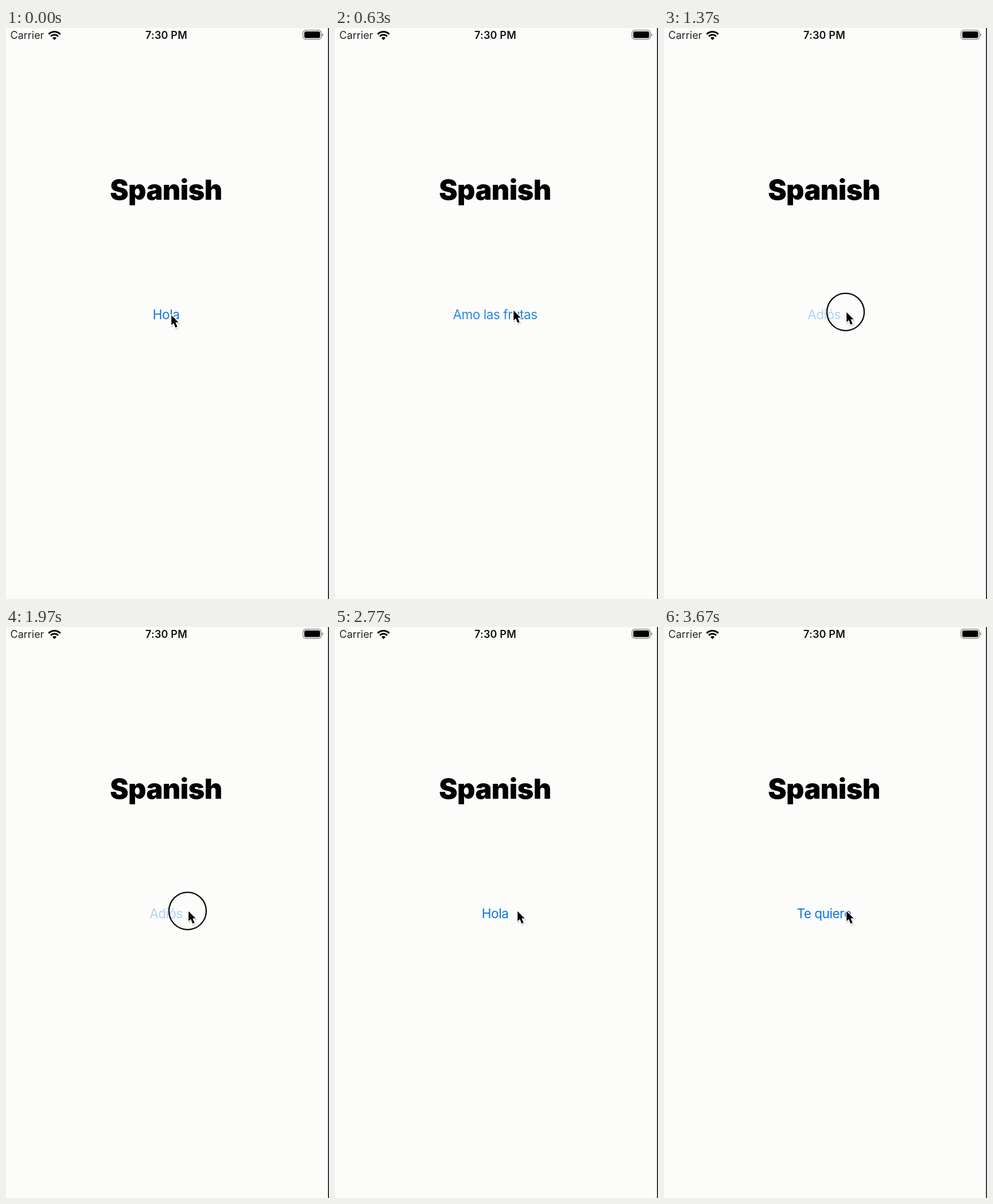
These frames come from a looping animation (563x994 px, 3710 ms). An HTML page:

```html
<!DOCTYPE html>
<html lang="en">
<head>
<meta charset="utf-8">
<title>Spanish phrases</title>
<style>
  html, body { margin: 0; width: 100%; height: 100%; overflow: hidden; background: #fcfcfa; }
  svg { display: block; width: 563px; height: 994px; }
  text { font-family: Inter, Roboto, sans-serif; }
  .status { font-size: 18px; }
  .clock { font-weight: 600; letter-spacing: .2px; text-anchor: middle; }
  .title { font-size: 48.5px; font-weight: 900; letter-spacing: -.5px; text-anchor: middle; }
  .word { font-size: 22.5px; letter-spacing: -.45px; text-anchor: middle; fill: #0b75e5; }
</style>
</head>
<body>
<svg viewBox="0 0 563 994">
  <rect width="563" height="994" fill="#fcfcfa"/>
  <rect x="561.3" width="1.7" height="994" fill="#1c1c2b"/>

  <text class="status" x="7.5" y="19" fill="#222">Carrier</text>
  <clipPath id="fan"><path d="M84.5 21L66.5 3V0H102.5V3Z"/></clipPath>
  <g clip-path="url(#fan)" fill="none" stroke="#050505" stroke-width="3">
    <circle cx="84.5" cy="20.5" r="14"/>
    <circle cx="84.5" cy="20.5" r="8.8"/>
    <circle cx="84.5" cy="20.5" r="4.7" fill="#050505" stroke="none"/>
  </g>
  <text class="status clock" x="279.5" y="19" fill="#111">7:30 PM</text>
  <rect x="517.7" y="3.7" width="32" height="16" rx="5" fill="none" stroke="#8f8f8f" stroke-width="1.5"/>
  <rect x="520" y="6" width="27.5" height="11.5" rx="2.8"/>
  <path d="M551.2 9.2Q553.2 10 553.2 12T551.2 14.8Z" fill="#8f8f8f"/>

  <text class="title" x="279" y="299">Spanish</text>
  <text class="word" id="word" x="279.1" y="506.7"></text>

  <circle id="ring" fill="none" r="32.5" stroke="#0a0a0a" stroke-width="2.3"/>
  <g id="cursor" stroke-linejoin="round">
    <path d="M0 0V17.2L4 13.6L7 21.5L10.4 20.1L7.2 12.5H12.3Z" transform="translate(.8 1.8)"
      fill="#000" stroke="#000" stroke-width="3.6" opacity=".13"/>
    <path d="M0 0V17.2L4 13.6L7 21.5L10.4 20.1L7.2 12.5H12.3Z"
      fill="#000" stroke="#fff" stroke-width="2.8" paint-order="stroke"/>
  </g>
</svg>
<script>
  const LOOP = 3710, FADE = 250, DIM = 0.3;
  const [word, ring, cursor] = ['word', 'ring', 'cursor'].map(id => document.getElementById(id));

  // A tap dims the button while held; releasing it shows the next phrase.
  const taps = [
    { down: 350, up: 450, text: 'Amo las frutas' },
    { down: 900, up: 1010, text: 'Adiós' },
    { down: 1340, up: 2180, text: 'Hola' },
    { down: 3300, up: 3400, text: 'Te quiero' }
  ];

  // Pointer stops: time, x, y
  const stops = [[0, 288.3, 500], [330, 311.3, 491.8], [650, 311.3, 491.8], [880, 318.2, 494.8]];

  const clamp = v => Math.min(1, Math.max(0, v));
  const smooth = v => v * v * (3 - 2 * v);

  function pointer(t) {
    let [, x, y] = stops[0];
    for (let i = 1; i < stops.length; i++) {
      const [t0, x0, y0] = stops[i - 1], [t1, x1, y1] = stops[i];
      const k = smooth(clamp((t - t0) / (t1 - t0)));
      x += (x1 - x0) * k;
      y += (y1 - y0) * k;
    }
    return [x, y];
  }

  function draw(t) {
    let text = 'Hola', alpha = 1, held = false;
    for (const tap of taps) {
      if (t >= tap.up) {
        text = tap.text;
        alpha = DIM + (1 - DIM) * smooth(clamp((t - tap.up) / FADE));
      } else if (t >= tap.down) {
        held = true;
        alpha = DIM;
      }
    }
    const [x, y] = pointer(t);
    if (word.textContent !== text) word.textContent = text;
    word.setAttribute('opacity', alpha);
    cursor.setAttribute('transform', `translate(${x} ${y})`);
    ring.setAttribute('visibility', held ? 'visible' : 'hidden');
    ring.setAttribute('cx', x - 1.7);
    ring.setAttribute('cy', y - 0.5);
  }

  const start = performance.now();
  function tick() {
    draw((performance.now() - start) % LOOP);
    requestAnimationFrame(tick);
  }
  draw(0);
  requestAnimationFrame(tick);
</script>
</body>
</html>
```
